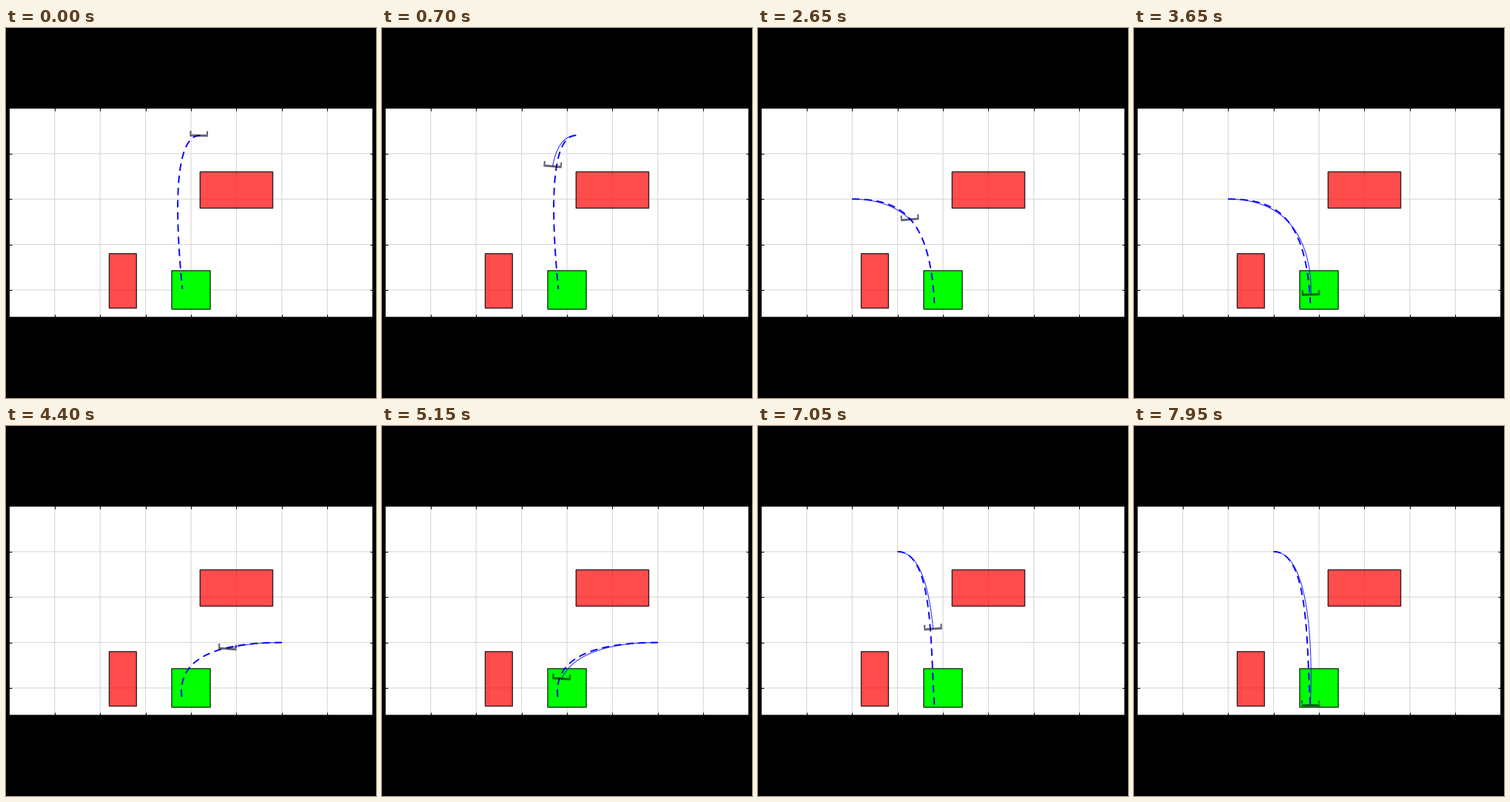
A matplotlib script that plays this animation: 500 by 500 pixels, repeating every 8000 ms.

```python
import numpy as np
import matplotlib.pyplot as plt
from matplotlib.animation import FuncAnimation
from matplotlib.patches import Rectangle

PX = 0.72           # one pixel in points at 100 dpi
UNIT = 61.4         # pixels per world unit
STEPS = 40          # frames per flight
GOAL_X = -0.19
ARM, POST = 0.2, 0.1

# start, goal height, launch reach, time warp, plan reach, plan bend
FLIGHTS = [
    ((0.2, 3.4), 0.02, -1.0, 1.27, -0.62, (-0.33, 1.45)),
    ((-2, 2), -0.29, 2.1, 1.2, 1.0, (-0.29, 1.69)),
    ((2, 1), -0.29, -2.5, 1.07, -1.1, (-0.39, 0.8)),
    ((-1, 3), -0.37, 1.0, 1.15, 0.8, (-0.28, 0.88)),
]


def bezier(u, *ctrl):
    a, b, c, d = np.array(ctrl, float)
    u = np.asarray(u)[:, None]
    v = 1 - u
    return v**3 * a + 3 * v**2 * u * b + 3 * v * u**2 * c + u**3 * d


def make_flight(start, goal_y, launch, warp, reach, bend):
    """Planned curve, flown positions and tilt; both curves leave level."""
    x, y = start
    goal = (GOAL_X, goal_y)
    u = np.linspace(0, 1, STEPS + 1)
    plan = bezier(np.linspace(0, 1, 120), start, (x + reach, y), bend, goal)
    path = bezier(u**warp, start, (x + launch, y), goal, goal)
    tilt = 0.085 * np.sign(launch) * np.sin(np.pi * u**0.7)
    return plan, path, tilt


flights = [make_flight(*f) for f in FLIGHTS]

fig = plt.figure(figsize=(5, 5), dpi=100, facecolor="black")
ax = fig.add_axes([0.5 - 4 * UNIT / 500, 0.292 - 0.6 * UNIT / 500,
                   8 * UNIT / 500, 4.6 * UNIT / 500])
ax.set(xlim=(-4, 4), ylim=(-0.6, 4), xticks=range(-3, 4), yticks=range(4))
ax.set_axisbelow(True)
ax.tick_params(direction="in", top=True, right=True, length=4 * PX,
               width=PX, labelbottom=False, labelleft=False)
ax.grid(color="0.83", lw=PX, snap=False)
for spine in ax.spines.values():
    spine.set(linewidth=PX, snap=False)


def box(x0, y0, x1, y1, color, alpha):
    ax.add_patch(Rectangle((x0, y0), x1 - x0, y1 - y0, facecolor=(color, alpha),
                           edgecolor=(0, 0, 0, 0.8), lw=1.4 * PX,
                           snap=False, zorder=2))


def line(color, width, z, **style):
    return ax.plot([], [], color=color, lw=width * PX, zorder=z,
                   solid_capstyle="butt", **style)[0]


box(0.2, 1.8, 1.8, 2.6, "red", 0.7)
box(-1.8, -0.4, -1.2, 0.8, "red", 0.7)
box(-0.425, -0.425, 0.425, 0.425, "lime", 1)

STEEL = (0, 0, 0.12, 0.6)
plan_line = line("blue", 1.9, 3, dashes=(10 / 1.9, 6.5 / 1.9))
trail = line((0, 0, 1, 0.8), 1.1, 4)
body = line(STEEL, 3, 6)
posts = line(STEEL, 2.2, 6)


def update(frame):
    n, j = divmod(frame, STEPS)
    plan, path, tilt = flights[n]
    c, s = np.cos(tilt[j + 1]), np.sin(tilt[j + 1])

    def place(points):
        return path[j + 1] + np.array(points) @ [[c, s], [-s, c]]

    plan_line.set_data(*plan.T)
    trail.set_data(*path[:j + 2].T)
    body.set_data(*place([(-ARM, 0), (ARM, 0)]).T)
    e, foot = ARM - 1 / UNIT, 1.5 / UNIT
    posts.set_data(*place([(-e, foot), (-e, POST), (np.nan, np.nan),
                           (e, foot), (e, POST)]).T)
    return plan_line, trail, body, posts


anim = FuncAnimation(fig, update, frames=len(FLIGHTS) * STEPS, interval=50,
                     repeat=True, repeat_delay=0)
plt.show()
```
